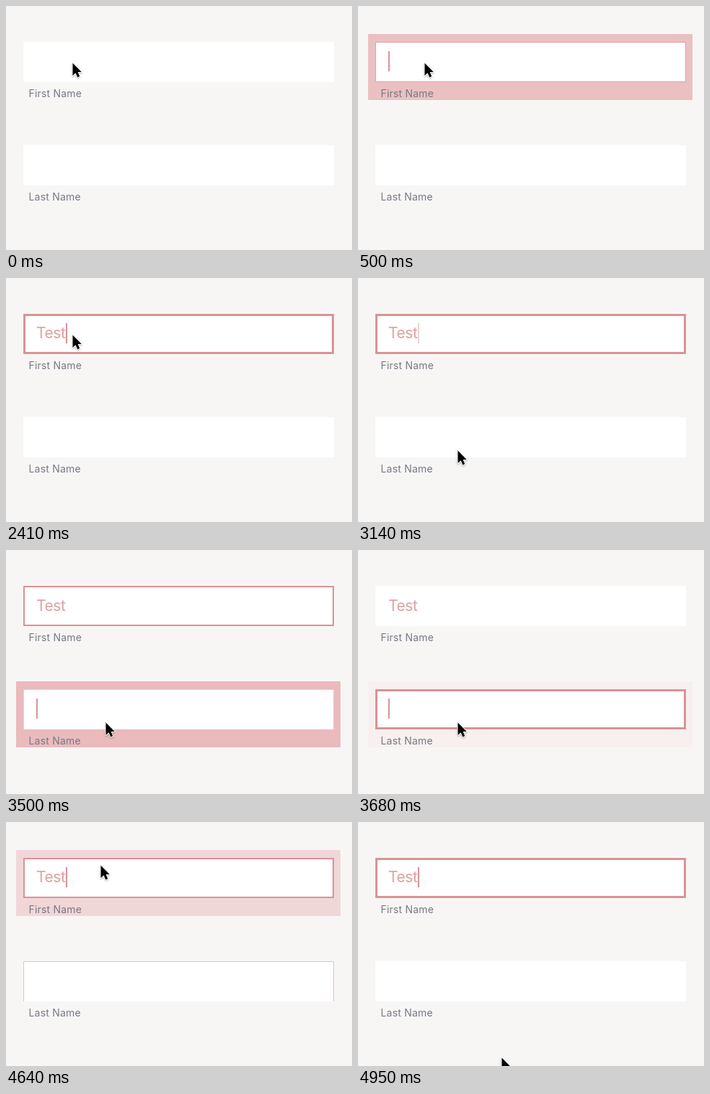
An HTML page for the animation above (4990 ms loop, 480 by 340 pixels).

```html
<!DOCTYPE html>
<html lang="en">
<head>
<meta charset="utf-8">
<title>Form focus</title>
<style>
  html, body { margin: 0; width: 100%; height: 100%; overflow: hidden; background: #f8f6f5; }
  #stage { position: relative; width: 480px; height: 340px; overflow: hidden; }
  .row { position: absolute; left: 0; width: 480px; height: 92px; }
  .row > * { position: absolute; }
  .glow { left: 14px; top: 0; width: 450px; height: 92px; background: #e2989c; opacity: 0; }
  .box { left: 24px; top: 11px; width: 431px; height: 56px; box-sizing: border-box;
    background: #fff; border: 0 solid; }
  .label { left: 31.5px; top: 73px; font: 14px/20px Inter, sans-serif; letter-spacing: .2px;
    color: #757a86; white-space: nowrap; }
  .text { left: 42px; top: 24px; height: 28px; font: 21px/28px Inter, sans-serif;
    letter-spacing: -.4px; color: #dfa0a2; white-space: nowrap; }
  .caret { position: absolute; left: 100%; top: 0; width: 2px; height: 28px; background: #da9296; }
  #mouse { position: absolute; left: 0; top: 0; overflow: visible;
    filter: drop-shadow(0 1px 1px rgba(0, 0, 0, .3)); }
</style>
</head>
<body>
<div id="stage">
  <svg id="mouse" width="14" height="22">
    <path d="M.5 .5V18L4.6 14.2L7.3 20.4L10.2 19.1L7.6 13.1H12.8Z"
      stroke="#fff" stroke-width="2" paint-order="stroke" stroke-linejoin="round"/>
  </svg>
</div>
<script>
const LOOP = 4990;
const FADE = [[0, .8], [70, .57], [140, .34], [230, .07], [290, 0]];
const FOCUS = [430, 3450, 4500];
const TYPED = [[1550, 'T'], [1910, 'Te'], [2180, 'Tes'], [2410, 'Test']];
// start, end, from, to
const MOVES = [
  [2730, 3140, [92, 79], [138, 240]],
  [3820, 4230, [138, 240], [131, 60]],
  [4650, 4950, [131, 60], [199, 328]]
];

const stage = document.getElementById('stage');
const mouse = document.getElementById('mouse');

function makeRow(top, name) {
  const row = document.createElement('div');
  row.className = 'row';
  row.style.top = top + 'px';
  row.innerHTML = `<div class="glow"></div><div class="box"></div>
    <div class="label">${name}</div>
    <div class="text"><span></span><i class="caret"></i></div>`;
  stage.insertBefore(row, mouse);
  const find = s => row.querySelector(s);
  return { glow: find('.glow'), box: find('.box'), text: find('.text'),
    value: find('span'), caret: find('.caret') };
}
const first = makeRow(39, 'First Name');
const last = makeRow(183, 'Last Name');

const clamp = (v, a = 0, b = 1) => Math.min(b, Math.max(a, v));
const ramp = (t, a, b) => clamp((t - a) / (b - a));
const smooth = p => p * p * (3 - 2 * p);

function along(points, t) {
  if (t <= points[0][0]) return points[0][1];
  for (let i = 1; i < points.length; i++) {
    const [a, u] = points[i - 1], [b, v] = points[i];
    if (t < b) return u + (v - u) * (t - a) / (b - a);
  }
  return points[points.length - 1][1];
}

const grow = (t, start) => 3 * ramp(t, start, start + 200);

function setBorder(row, w) {
  const side = w > 0 ? Math.max(1, Math.floor(w)) : 0;
  row.box.style.borderWidth = `${side}px ${side}px ${Math.floor(w)}px`;
  row.box.style.borderColor = `rgba(219, 146, 150, ${clamp(w * w * .75)})`;
}

function render(t) {
  const [a, b, c] = FOCUS;

  setBorder(first, t < b ? grow(t, a) : t < c ? 3 - grow(t, b) : grow(t, c));
  setBorder(last, t < c ? grow(t, b) : 3 - grow(t, c));

  first.glow.style.opacity = t < a ? .8 * ramp(t, 320, a)
    : along(FADE, t - (t < c ? a : c));
  // the second glow lingers faintly until focus moves on
  last.glow.style.opacity = t < b || t >= c ? 0 : along(FADE, Math.min(t - b, 230));

  let word = '';
  for (const [at, s] of TYPED) if (t >= at) word = s;
  first.value.textContent = word;
  first.text.style.top = (t >= b && t < c ? 25 : 24) + 'px';

  let on = 0;
  if (t >= c) on = 1;
  else if (t >= b) on = 0;
  else if (t >= 1550) on = 1 - ramp(t, 3060, 3200);
  else if (t >= 410) on = 1 - ramp(t, 1110, 1230);
  first.caret.style.opacity = on;
  last.caret.style.opacity = t >= b && t < c ? 1 - ramp(t, 4100, 4230) : 0;

  let [x, y] = MOVES[0][2];
  for (const [s, e, from, to] of MOVES) {
    if (t < s) break;
    const p = smooth(ramp(t, s, e));
    x = from[0] + (to[0] - from[0]) * p;
    y = from[1] + (to[1] - from[1]) * p;
  }
  mouse.style.transform = `translate(${x}px, ${y}px)`;
}

const begin = performance.now();
function tick() {
  render((performance.now() - begin) % LOOP);
  requestAnimationFrame(tick);
}
tick();
</script>
</body>
</html>
```
